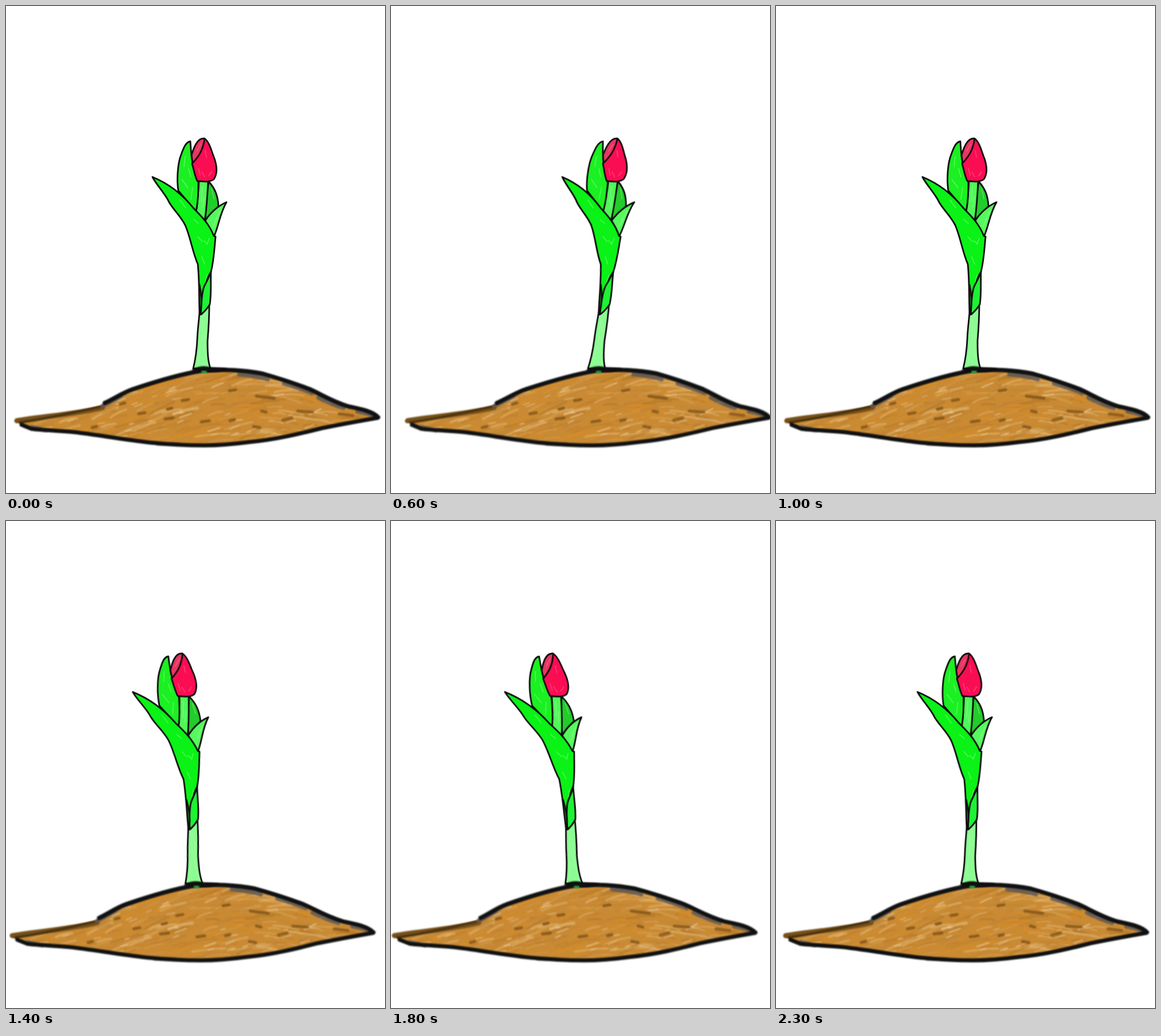
An HTML page that plays this animation: 660x849 px, repeating every 2400 ms.

```html
<!DOCTYPE html>
<html lang="en">
<head>
<meta charset="utf-8">
<title>Swaying tulip</title>
<style>
  html, body { margin: 0; width: 100%; height: 100%; overflow: hidden; background: #fff; }
  svg { display: block; width: 660px; height: 849px; }

  /* Everything leans about the bottom edge, one pose per 100 ms. */
  #scene { transform-box: view-box; transform-origin: 0 849px; animation: sway 2400ms infinite; }
  @keyframes sway {
    0%       { transform: skewX(0deg);      animation-timing-function: steps(5); }
    20.8333% { transform: skewX(-5.6deg);   animation-timing-function: steps(5); }
    41.6667% { transform: skewX(0deg);      animation-timing-function: steps(4); }
    58.3333% { transform: skewX(3.57deg);   animation-timing-function: steps(3); }
    70.8333% { transform: skewX(7.03deg);   animation-timing-function: steps(3); }
    83.3333% { transform: skewX(3.57deg);   animation-timing-function: steps(4); }
    100%     { transform: skewX(0deg); }
  }

  path { stroke-linecap: round; stroke-linejoin: round; }
  #plant path { stroke: #100c10; stroke-width: 2.8; }
  #plant .shine path { fill: none; stroke: #a9ffa4; stroke-width: 1.3; opacity: .5; }
  #plant .pink path { fill: none; stroke: #ff7d9c; stroke-width: 1.4; opacity: .5; }
  .line { fill: none; stroke: #101112; }
  .gray { fill: none; stroke: #56565a; stroke-width: 7; opacity: .8; }
  .soft { filter: blur(.8px); }
</style>
</head>
<body>
<svg viewBox="0 0 660 849">
  <defs>
    <path id="soil" d="M14 723C65 713 120 708 165 696C182 689 198 674 220 667C260 654 302 641 340 635C375 631 416 634 448 640C480 649 509 659 530 667C550 676 568 688 597 697C616 700 640 705 650 718C624 723 580 731 550 737C514 746 470 757 425 761C395 765 365 767 345 767C320 767 280 765 250 762C205 757 155 748 120 744C90 741 55 740 43 738C34 733 26 729 14 723Z"/>
    <clipPath id="inSoil"><use href="#soil"/></clipPath>
  </defs>

  <g id="scene">
    <g id="mound">
      <use href="#soil" fill="#c98a33"/>
      <g clip-path="url(#inSoil)">
        <g id="grain" class="soft" fill="none"></g>
        <g id="clods" class="soft" fill="none" stroke="#7d5118" stroke-width="5"></g>
      </g>
      <g class="soft">
        <path class="line" style="stroke:#765019" stroke-width="9" d="M19 723C65 715 120 712 168 700"/>
        <path class="line" style="stroke:#48320f" stroke-width="4" d="M24 726C70 720 115 709 163 699"/>
        <path class="gray" d="M168 697C180 692 190 686 200 680M406 642Q436 645 456 651M484 658Q510 665 532 675M544 683Q566 694 588 701M612 707Q634 711 644 716M45 734L70 740M264 763L300 764"/>
        <path class="line" stroke-width="7.5" d="M172 692C188 685 201 675 221 668C260 655 302 642 340 636C375 632 416 635 447 641C479 650 508 660 529 668C549 677 567 689 596 698C615 702 638 706 648 717"/>
        <path class="line" stroke-width="7" d="M647 718C624 722 580 730 550 736C514 745 470 756 425 760C395 764 365 766 345 766C320 766 280 764 250 761C205 756 155 747 120 743C90 740 55 739 44 737L27 730"/>
      </g>
    </g>

    <g id="plant">
      <path fill="#8cfb93" d="M337 534C336 548 334 560 333 582C332 602 329 620 326 632L356 632C351 618 351 600 351 584C353 560 354 540 354 518Z"/>
      <path fill="#22cc2a" d="M353 306C363 317 369 329 370 349L347 374L348 340Z"/>
      <path fill="#4ff858" d="M336 305L352 305C351 325 350 350 346 374L331 358C334 340 335 322 336 305Z"/>
      <path fill="#1bf022" d="M321 236C313 237 309 248 305 259C299 274 297 302 300 322L331 358C335 340 335 324 335 307C329 290 323 272 322 250Z"/>
      <path fill="#e83562" d="M345 231C333 230 327 247 323 260L325 275C335 263 344 252 346 233Z"/>
      <path fill="#fb0d53" d="M346 231C355 238 358 254 363 266C368 281 368 293 362 302C354 308 343 306 333 305C328 294 327 284 324 275C334 264 343 253 346 231Z"/>
      <path fill="#55f95d" d="M384 342C368 349 355 362 347 374L362 402C370 386 372 362 384 342Z"/>
      <path fill="#0af216" d="M255 298C284 310 307 328 326 352C339 365 354 380 362 401L365 402C363 420 362 444 357 463C346 481 341 504 341 537L337 534C336 508 337 480 334 450C325 430 321 402 312 382C304 366 292 356 284 342C278 328 262 312 255 298Z"/>
      <path fill="#1df233" d="M357 463C356 480 358 500 355 520C350 528 345 534 339 538C341 516 340 502 345 489C350 479 354 472 357 463Z"/>
      <path fill="none" d="M337 486Q342 508 339 535"/>
      <g class="shine">
        <path d="M334 402l8 9M344 409l6 5M354 405l-4 11M341 437l5 13M303 338l10 14M327 372l8 7M350 469l-3 12"/>
        <path d="M312 262l-2 18M318 284l4 14M306 302l11 15M325 316l-3 21M342 314l-2 28M345 332l-2 19"/>
        <path d="M374 356l-10 18M367 372l-7 13M358 318l4 18M342 546l-1 38M347 558l-2 46M338 592l-3 30M347 606l3 18"/>
      </g>
      <g class="pink"><path d="M341 289l5 9M353 296l5-7M335 283l3 12M347 252l2 12M339 241l-7 12"/></g>
      <g class="soft">
        <path fill="#0c1110" stroke-width="4" d="M325 635C334 629 346 628 356 631L384 633C372 638 350 638 325 635Z"/>
        <path style="stroke:#28a53c;stroke-width:4" d="M342 638h6"/>
      </g>
    </g>
  </g>
</svg>
<script>
  let seed = 41;
  const rand = () => (seed = seed * 16807 % 2147483647) / 2147483647;
  const pick = list => list[Math.floor(rand() * list.length)];

  function stroke(parent, d, attrs = {}) {
    const path = document.createElementNS('http://www.w3.org/2000/svg', 'path');
    path.setAttribute('d', d);
    for (const key in attrs) path.setAttribute(key, attrs[key]);
    parent.append(path);
  }

  // Crayon streaks that rise on the left and fall on the right.
  const grain = document.getElementById('grain');
  const tones = ['#dc8d25', '#dc8d25', '#c07c28', '#b9823a', '#a87024', '#d9a65a', '#e6c083'];
  for (let i = 0; i < 330; i++) {
    const x = 40 + rand() * 570, y = 640 + rand() * 122;
    const slope = (x < 330 ? -0.34 : x < 430 ? -0.15 : 0.1) + (rand() - 0.5) * 0.4;
    const len = 20 + rand() * 38;
    stroke(grain, `M${x} ${y}q${len / 2} ${len * slope / 2 - 3} ${len} ${len * slope}`, {
      stroke: pick(tones), 'stroke-width': 1.5 + rand() * 3, opacity: 0.5
    });
  }
  for (let i = 0; i < 45; i++) {
    const x = 90 + rand() * 480, y = 665 + rand() * 88, len = 7 + rand() * 14;
    stroke(grain, `M${x} ${y}l${len} ${-len * (0.1 + rand() * 0.4)}`, {
      stroke: '#f5e2c0', 'stroke-width': 1 + rand(), opacity: 0.65
    });
  }

  const clods = document.getElementById('clods');
  [[199, 694], [231, 711], [277, 720], [281, 703], [307, 688], [340, 725], [390, 723],
   [389, 671], [436, 680], [445, 706], [431, 733], [453, 682], [150, 735]].forEach(([x, y], i) =>
    stroke(clods, `M${x} ${y}l${8 + i % 3 * 3} ${x < 430 ? -2 : 2}`, { opacity: 0.8 }));
  stroke(clods, 'M482 722l16-4M508 706l26 2M580 711l24 3', { opacity: 0.75 });
</script>
</body>
</html>
```
